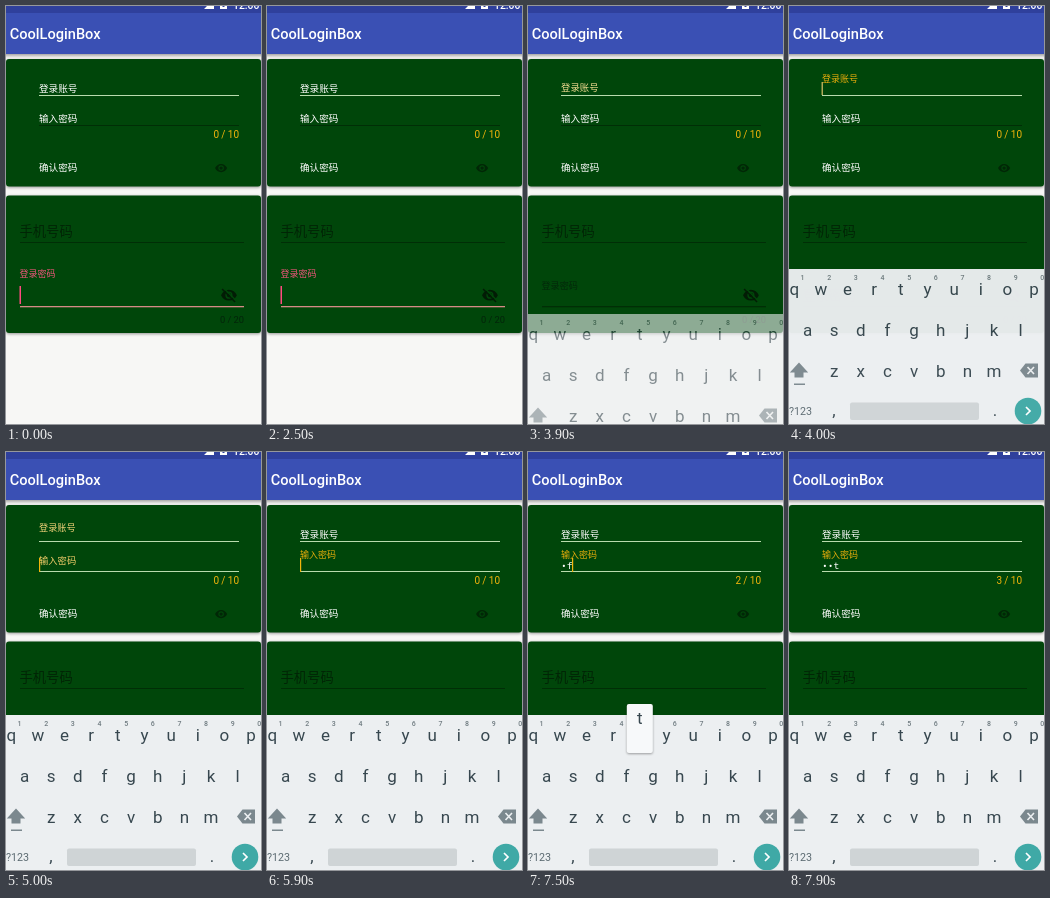
Recreate the animation shown at these times as an HTML page. Size 255 px wide and 418 px high, loop 8 s.

```html
<!DOCTYPE html>
<html lang="zh">
<head>
<meta charset="utf-8">
<title>Login form</title>
<style>
html, body { margin: 0; width: 100%; height: 100%; overflow: hidden; background: #f7f7f5; }
svg { display: block; width: 255px; height: 418px; }
text { font-family: Roboto, "Noto Sans CJK SC", "Noto Sans CJK", sans-serif; white-space: pre; }
.cjk { font-family: "Noto Sans CJK SC", "Noto Sans CJK", sans-serif; font-size: 9.6px; fill: #fff; }
.hint { font-size: 13.3px; fill: #000; fill-opacity: .48; }
.mono { font-family: "Noto Sans Mono", "DejaVu Sans Mono", monospace; font-size: 9.5px; fill: #fff; }
.amber { fill: #f2b50c; font-size: 10px; }
.card { fill: #00460a; filter: drop-shadow(0 1.5px 1.5px rgba(0, 0, 0, .4)); }
.end { text-anchor: end; }
.key { font-size: 17px; fill: #37474f; text-anchor: middle; }
.num { font-size: 7px; font-weight: 500; fill: #6f7b80; text-anchor: middle; }
.pop { filter: drop-shadow(0 1px 1px rgba(0, 0, 0, .35)); }

/* One loop is 8 s; 1.25% is a tenth of a second. */
.a { animation: 8s step-end -20ms infinite; }

.caretPhone { animation-name: caretPhone; }
@keyframes caretPhone {
  0%, 20%, 31.25%, 42.5% { opacity: 1; }
  13.75%, 25%, 36.25%, 47.5%, 100% { opacity: 0; }
}
.caretUser { animation-name: caretUser; }
@keyframes caretUser {
  0%, 57.5%, 100% { opacity: 0; }
  50% { opacity: 1; }
}
.caretPass { animation-name: caretPass; }
@keyframes caretPass {
  0% { opacity: 0; transform: none; }
  61.25% { opacity: 1; transform: none; }
  67.5% { opacity: 0; transform: none; }
  73.75% { opacity: 1; transform: none; }
  81.25% { opacity: 1; transform: translateX(5.2px); }
  82.5% { opacity: 1; transform: translateX(11px); }
  87.5% { opacity: 0; transform: translateX(11px); }
  93.75% { opacity: 1; transform: translateX(11px); }
  95% { opacity: 1; transform: translateX(16.8px); }
  98.75%, 100% { opacity: 0; transform: translateX(16.8px); }
}

.user { animation-name: user; }
@keyframes user {
  0%, 65%, 100% { transform: translate(33px, 85.6px); font-size: 9.6px; fill: #fff; }
  47.5% { transform: translate(33px, 85.4px); font-size: 9.6px; fill: #fff4d8; }
  48.75% { transform: translate(33px, 84.6px); font-size: 9.4px; fill: #f3dc92; }
  50% { transform: translate(33px, 75.6px); font-size: 9px; fill: #e9ae0c; }
  61.25% { transform: translate(33px, 76.2px); font-size: 9px; fill: #ecbb34; }
  62.5% { transform: translate(33px, 79.4px); font-size: 9.2px; fill: #f2d279; }
  63.75% { transform: translate(33px, 84px); font-size: 9.5px; fill: #faeecb; }
}
.pass { animation-name: pass; }
@keyframes pass {
  0% { transform: translate(33px, 115.6px); font-size: 9.6px; fill: #fff; }
  61.25% { transform: translate(33px, 115px); font-size: 9.6px; fill: #fbeecb; }
  62.5% { transform: translate(33px, 111.6px); font-size: 9.3px; fill: #f0cd6a; }
  63.75% { transform: translate(33px, 107.6px); font-size: 9.1px; fill: #ebb524; }
  65%, 100% { transform: translate(33px, 106.4px); font-size: 9px; fill: #e9ae0c; }
}
.passLine { animation-name: passLine; }
@keyframes passLine {
  0% { fill: #002e06; }
  61.25% { fill: #3f6f3c; }
  62.5%, 100% { fill: #b9dcae; }
}
.phonePass { animation-name: phonePass; }
@keyframes phonePass {
  0% { transform: translate(13.5px, 271.4px); font-size: 9px; fill: #f0567c; }
  47.5% { transform: translate(13.5px, 277px); font-size: 9px; fill: #5c4030; }
  48.75% { transform: translate(13.5px, 283.4px); font-size: 9.1px; fill: #02280a; }
  50%, 100% { transform: translate(13.5px, 294px); font-size: 13.3px; fill: #02280a; }
}
.phoneLine { animation-name: phoneLine; }
@keyframes phoneLine {
  0% { fill: #d58a86; }
  47.5%, 100% { fill: #002e06; }
}

.board { animation-name: board; }
@keyframes board {
  0% { transform: translateY(155px); opacity: 0; }
  47.5% { transform: translateY(110px); opacity: .12; }
  48.75% { transform: translateY(45px); opacity: .6; }
  50% { transform: none; opacity: .97; }
  51.25%, 100% { transform: none; opacity: 1; }
}

.n0 { animation-name: n0; }
.n1 { animation-name: n1; }
.n2 { animation-name: n2; }
.n3 { animation-name: n3; }
@keyframes n0 { 0% { opacity: 1; } 81.25%, 100% { opacity: 0; } }
@keyframes n1 { 0%, 82.5%, 100% { opacity: 0; } 81.25% { opacity: 1; } }
@keyframes n2 { 0%, 95%, 100% { opacity: 0; } 82.5% { opacity: 1; } }
@keyframes n3 { 0% { opacity: 0; } 95%, 100% { opacity: 1; } }

.popD { animation-name: popD; }
.popF { animation-name: popF; }
.popT { animation-name: popT; }
@keyframes popD { 0%, 81.25%, 100% { opacity: 0; } 78.75% { opacity: 1; } }
@keyframes popF { 0%, 83.75%, 100% { opacity: 0; } 82.5% { opacity: 1; } }
@keyframes popT { 0%, 96.25%, 100% { opacity: 0; } 93.75% { opacity: 1; } }
</style>
</head>
<body>
<svg viewBox="0 0 255 418" xmlns="http://www.w3.org/2000/svg">
  <defs>
    <linearGradient id="shade" x2="0" y2="1">
      <stop stop-color="#000" stop-opacity=".32"/>
      <stop offset="1" stop-color="#000" stop-opacity="0"/>
    </linearGradient>
    <path id="eye" d="M1 12C3 7.500 7 4.500 12 4.500S21 7.500 23 12C21 16.500 17 19.500 12 19.500S3 16.500 1 12ZM12 7A5 5 0 0 0 12 17A5 5 0 0 0 12 7ZM12 9A3 3 0 0 1 12 15A3 3 0 0 1 12 9Z" fill-rule="evenodd"/>
  </defs>

  <rect width="255" height="418" fill="#f7f7f5"/>
  <rect y="48" width="255" height="4" fill="url(#shade)"/>
  <rect width="255" height="48" fill="#3a50b4"/>
  <rect width="255" height="7" fill="#2f409c"/>
  <path d="M198 3L208 -7V3ZM214 -7H221V3H214Z" fill="#fff"/>
  <path d="M216.500 -1H218.500V1H216.500Z" fill="#2f409c"/>
  <text x="227" y="2.600" font-size="10.400" font-weight="500" fill="#fff">12:00</text>
  <text x="3.700" y="33.300" font-size="14.600" font-weight="500" fill="#fff">CoolLoginBox</text>

  <rect class="card" y="53" width="255" height="127.500" rx="3"/>
  <text class="cjk a user">登录账号</text>
  <rect x="33" y="89" width="200" height="1" fill="#b9dcae"/>
  <rect class="a caretUser" x="32.600" y="76" width="1.200" height="13" fill="#dcc26a"/>
  <text class="cjk a pass">输入密码</text>
  <rect class="a passLine" x="33" y="119" width="200" height="1"/>
  <g class="mono">
    <text class="mono a n1" x="33" y="117.300">d</text>
    <text class="mono a n2" x="33" y="117.300">•f</text>
    <text class="mono a n3" x="33" y="117.300">••t</text>
  </g>
  <rect class="a caretPass" x="33" y="106" width="1.200" height="14" fill="#f2b50c"/>
  <g id="count"></g>
  <text class="amber end" x="233" y="131.500"> / 10</text>
  <text class="cjk" x="33" y="164.600">确认密码</text>
  <use href="#eye" transform="translate(208.500 155.500) scale(.55)" fill="#002706"/>

  <rect class="card" y="189.500" width="255" height="137.500" rx="3"/>
  <text class="cjk hint" x="13.500" y="230">手机号码</text>
  <rect x="14" y="236" width="224" height="1" fill="#002e06"/>
  <text class="cjk a phonePass">登录密码</text>
  <rect class="a phoneLine" x="14" y="300" width="224" height="1.300"/>
  <rect class="a caretPhone" x="13.500" y="280" width="1.500" height="18" fill="#ff4a80"/>
  <g transform="translate(214.300 280.500) scale(.72)">
    <use href="#eye" fill="#021c05"/>
    <path d="M4.500 2L22.500 20" stroke="#00460a" stroke-width="2"/>
    <path d="M2.500 3.500L20.500 21.500" stroke="#021c05" stroke-width="2"/>
  </g>
  <text class="end" x="238" y="317.300" font-size="9.300" fill="#02240a">0 / 20</text>

  <g class="a board">
    <rect y="263" width="255" height="156" fill="#eceff1"/>
    <g id="keys"></g>
    <path d="M10 356.500L0.800 366.500H5.500V371.500H14.500V366.500H19.200Z" fill="#7b888e"/>
    <rect x="5" y="377.500" width="11" height="1.500" fill="#7b888e"/>
    <path d="M231 364.500L236.500 357.500H249V371.500H236.500Z" fill="#7b888e"/>
    <path d="M238.500 361L245 368M245 361L238.500 368" stroke="#eceff1" stroke-width="1.600"/>
    <text x="0" y="409" font-size="10.700" fill="#5b6a71">?123</text>
    <text class="key" x="45" y="409.500">,</text>
    <rect x="61" y="396.500" width="129" height="17.500" rx="2" fill="#cfd4d6"/>
    <text class="key" x="206" y="409.500">.</text>
    <circle cx="239" cy="405" r="13.300" fill="#3fa9a6"/>
    <path d="M237 401L241 405L237 409" fill="none" stroke="#fff" stroke-width="1.700"/>
  </g>
  <g id="pops"></g>
</svg>
<script>
const pitch = 26.63;
const find = id => document.getElementById(id);
const label = (cls, x, y, s) => `<text class="${cls}" x="${x}" y="${y}">${s}</text>`;

const rows = [["qwertyuiop", 5.3, 289], ["asdfghjkl", 18.6, 329.5], ["zxcvbnm", 45.2, 371]];
find("keys").innerHTML = rows.map(([chars, x, y], row) =>
  [...chars].map((c, i) => {
    const cx = x + i * pitch;
    const digit = row ? "" : label("num", cx + 8.3, 274, (i + 1) % 10);
    return label("key", cx, y, c) + digit;
  }).join("")).join("");

find("count").innerHTML = [0, 1, 2, 3].map(n => label(`amber a n${n}`, 207.6, 131.5, n)).join("");

// Preview bubble: stands on the pressed key and reaches above it
const pop = (c, x, bottom) => `<g class="a pop${c.toUpperCase()}">
  <rect class="pop" x="${x - 13}" y="${bottom - 50}" width="26" height="49" rx="2" fill="#f7f9fa"/>
  ${label("key", x, bottom - 30, c)}</g>`;
find("pops").innerHTML = pop("d", 71.9, 343) + pop("f", 98.5, 343) + pop("t", 111.8, 302);
</script>
</body>
</html>
```
